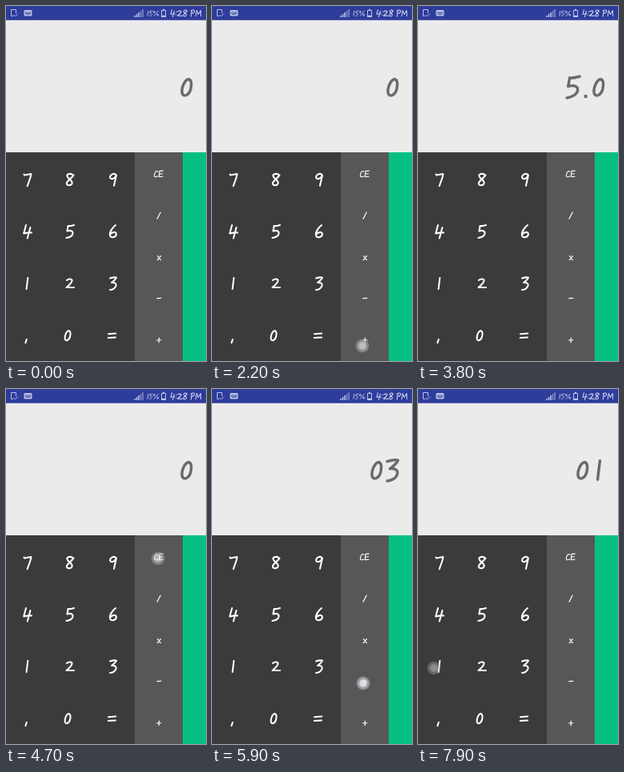
An HTML page for the animation above (8000 ms loop, 250 by 444 pixels).

```html
<!DOCTYPE html>
<html lang="en">
<head>
<meta charset="utf-8">
<title>Calculator</title>
<style>
html, body { margin: 0; width: 100%; height: 100%; overflow: hidden; background: #3b3b3b; }
svg { display: block; width: 100%; height: 100%; }
.ink { fill: none; stroke-width: 2.05; stroke-linecap: round; stroke-linejoin: round; }
</style>
</head>
<body>
<svg viewBox="0 0 250 444" role="img" aria-label="Calculator">
  <defs>
    <radialGradient id="glow">
      <stop offset="0" stop-color="#f4f4f6" stop-opacity=".92"/>
      <stop offset=".48" stop-color="#e6e6ea" stop-opacity=".88"/>
      <stop offset=".66" stop-color="#a8a8b0" stop-opacity=".75"/>
      <stop offset=".82" stop-color="#b4b4bc" stop-opacity=".7"/>
      <stop offset="1" stop-color="#aaa" stop-opacity="0"/>
    </radialGradient>
  </defs>
  <rect width="250" height="183" fill="#ebebeb"/>
  <rect width="250" height="17.7" fill="#2e3c9a"/>
  <rect y="183" width="161" height="261" fill="#3b3b3b"/>
  <rect x="161" y="183" width="60" height="261" fill="#575757"/>
  <rect x="221" y="183" width="29" height="261" fill="#06c083"/>

  <!-- status icons -->
  <g fill="none" stroke="#b9c1e6">
    <path d="M9 12.5H6.5V4.5H12.5V9M9.5 11l2 2 3.5-3.5"/>
    <rect x="23" y="5.5" width="9" height="6.5" rx=".5" fill="#b9c1e6"/>
    <path d="M25.5 10.2h4" stroke="#2e3c9a" stroke-width=".8"/>
    <g stroke="#2e3c9a" stroke-width=".9"><circle cx="25.5" cy="8.8" r="1.3"/><circle cx="29.5" cy="8.8" r="1.3"/></g>
    <path d="M161 14v-2M163.5 14v-4M166 14V8" stroke-width="1.6"/>
    <path d="M168.5 14V6M171 14V4" stroke="#7f8ac8" stroke-width="1.6"/>
    <rect x="194.5" y="5.5" width="5" height="8"/>
    <path d="M196 4.4h2M195 12.3h4" stroke-width="1.3"/>
  </g>

  <g id="labels"></g>
  <g id="display" role="img"></g>
  <circle id="touch" r="9" fill="url(#glow)"/>
</svg>
<script>
// Handwritten strokes, centred on the origin at keypad size
const GLYPHS = {
  0: 'M1.8-6C-1.5-6-4 1-3.3 4.5C-2.5 7.5 2 6.5 3.2 1C4-3 3.5-6 1-5.8',
  1: 'M1-7L-.7 7',
  2: 'M-4-4C-2-6 3-6 2.5-3.5C2-1-2 3-4.5 5C-1 4.2 2 5.5 5 5',
  3: 'M-4-6.5C-1-7.5 2-8 4-7.3C3-5 0-2.5-2-1C1-1.5 4-.5 3.6 2.5C3 6-1 8-4 8',
  4: 'M-2-8L-4.8 2.4C-1 1.6 2 1.2 5 1.4M3.4-5L-.2 8.6',
  5: 'M-2.5-7C0-6.5 3-7.5 5-8M-2.4-7L-3.6-.5C0-1.8 4-1 3.5 2.5C3 5.5-1 7.5-4.5 8',
  6: 'M3-8C-1-5-5 1-4 5C-3 8.6 3 7.6 3.8 4C4.2 0 0 0-3.4 3.2',
  7: 'M-4.6-6.5L-3.8-5.4L4.4-7C4-2 .8 4-.3 8.3',
  8: 'M3.8-5.5C1-8.4-4-7-3.6-4.4C-3-1 3.4 1 2.6 4.6C2 8-4.4 8-4.2 4.8C-3.5 1 3-2 4.4-5.5',
  9: 'M3.8-5C1-8.5-4-5.5-4-2C-3 1 2 0 3.8-5C3.8-3 2 3 1 8.2',
  ',': 'M.8-2L-.6 2.2',
  '.': 'M-.3 6.6l.4 0l0 .5l-.4 0z',
  ':': 'M.5-3h.2M-.3 4h.2',
  '=': 'M-4.6-1.8L4.6-2.4M-4.8 3L4.4 2.6',
  '+': 'M-4.4 0L4.4-.4M.3-4.6L-.3 4.6',
  '-': 'M-3.8.2L3.8-.2',
  '×': 'M-3.2-4L3.2 4.5M3.4-4L-3.6 4.5',
  '/': 'M3.7-6.6L-3.5 7',
  '%': 'M6-7L-5 7M-5-6a2 2.4 0 1 0 .1 0M5 2a2 2.4 0 1 0 .1 0',
  C: 'M4-5C0-9.5-5 0-4 5C-3 8 1 7 4 5',
  E: 'M4.8-7L-3-6.5L-4 6.5L4.4 6M-3.4 0L3.4-.5',
  P: 'M-2-6.5L-4 8M-4-5.5C1-10 7-7 4-2.5C2 0-1 1-3 1',
  M: 'M-7 7.5L-4.5-7L-.5 3L5.5-7L6 7.5'
};
const $ = id => document.getElementById(id);
const glyph = (c, x, y, scale = 1, color = '#fff') =>
  `<path class="ink" d="${GLYPHS[c]}" stroke="${color}" transform="translate(${x} ${y}) scale(${scale})"/>`;

const keys = [
  ['7', 27, 217], ['8', 80, 217], ['9', 134, 216.5],
  ['4', 27, 282], ['5', 80, 282], ['6', 134, 282],
  ['1', 26.3, 347], ['2', 80, 347], ['3', 134, 347],
  [',', 25, 419], ['0', 77, 412], ['=', 132.6, 412],
  ['C', 187.6, 210, .55], ['E', 193.6, 210, .55],
  ['/', 191, 262, .6], ['×', 191.4, 315, .6], ['-', 191.3, 365.5, .65], ['+', 191.2, 418, .6]
];
const status = [
  ['1', 177.2, 9.3, .42], ['5', 181.2, 9.3, .4], ['%', 187.5, 9.3, .44],
  ['4', 208.5, 9, .54], [':', 213, 9, .54], ['2', 217.3, 9.3, .6], ['8', 224, 9, .54],
  ['P', 233.3, 9, .52], ['M', 240.6, 9, .5]
];
$('labels').innerHTML =
  keys.map(k => glyph(...k)).join('') + status.map(s => glyph(...s, '#cbd1ee')).join('');

const LOOP = 8000, STEP = 100, TOUCH = 500;
// start, x, y, delay until the result shows, result
const taps = [
  [1500, 80, 348, 200, '02'],
  [1950, 188, 425, 200, '0'],
  [2400, 136, 348, 200, '03'],
  [3200, 135, 424, 300, '5.0'],
  [4400, 190, 212, 200, '0'],
  [5300, 136, 346, 200, '03'],
  [5900, 189, 368, 200, '0'],
  [7500, 20, 349, 200, '01']
];

let shown;
function show(value) {
  if (value === shown) return;
  shown = value;
  let edge = 235.7, out = '';
  for (const c of [...value].reverse()) {
    const width = c === '.' ? 12 : 20;
    out += glyph(c, edge - width / 2, 101.5, 1.68, '#6b6b6b');
    edge -= width;
  }
  $('display').innerHTML = out;
  $('display').setAttribute('aria-label', value);
}

function draw(now) {
  const t = Math.floor(now % LOOP / STEP) * STEP;
  let value = '0', alpha = 0;
  for (const [start, x, y, delay, result] of taps) {
    const age = t - start;
    if (age >= delay) value = result;
    if (age >= 0 && age < TOUCH) {
      alpha = 1 - .5 * (age / 400) ** 1.5;
      $('touch').setAttribute('cx', x);
      $('touch').setAttribute('cy', y);
    }
  }
  $('touch').setAttribute('opacity', alpha);
  show(value);
}

const began = performance.now();
function tick() {
  draw(performance.now() - began);
  requestAnimationFrame(tick);
}
tick();
</script>
</body>
</html>
```
